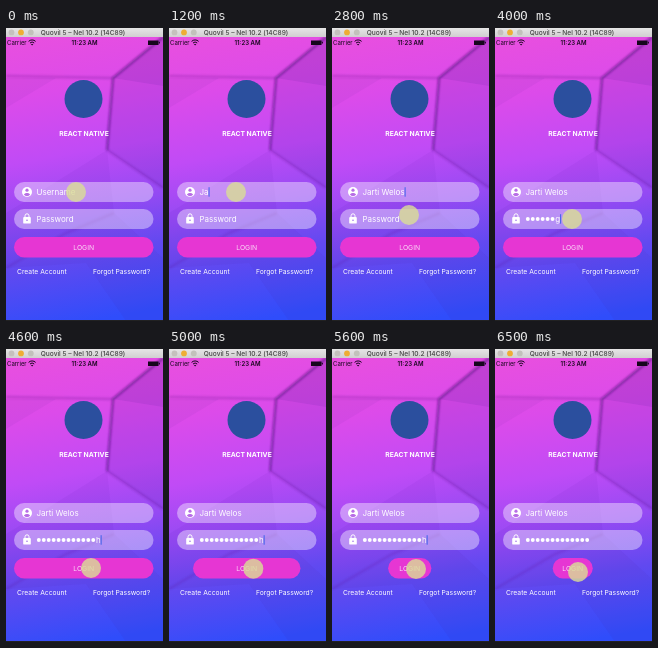
An HTML page for the animation above (6800 ms loop, 157 by 293 pixels).

```html
<!DOCTYPE html>
<html lang="en">
<head>
<meta charset="utf-8">
<style>
  html, body { margin: 0; width: 100%; height: 100%; overflow: hidden; }
  svg { display: block; width: 157px; height: 293px; }
  text { font-family: Inter, Roboto, sans-serif; fill: #fff; white-space: pre; }
  .field { font-size: 8px; }
  .small { font-size: 6.75px; }
  .status { font-size: 6px; fill: #16061c; }
  .mid { text-anchor: middle; }
</style>
</head>
<body>
<svg viewBox="0 0 157 293">
  <defs>
    <linearGradient id="sky" x1=".45" y1="0" x2=".55" y2="1">
      <stop offset="0" stop-color="#e84fdf"/>
      <stop offset=".2" stop-color="#dc4bea"/>
      <stop offset=".42" stop-color="#c04bf6"/>
      <stop offset=".6" stop-color="#964af3"/>
      <stop offset=".78" stop-color="#6149f0"/>
      <stop offset="1" stop-color="#2f4dfb"/>
    </linearGradient>
    <linearGradient id="bar" x1="0" y1="0" x2="0" y2="1">
      <stop offset="0" stop-color="#e6e5e6"/>
      <stop offset="1" stop-color="#d0cfd0"/>
    </linearGradient>
    <filter id="soft"><feGaussianBlur stdDeviation="1"/></filter>
  </defs>

  <rect width="157" height="293" fill="url(#sky)"/>
  <g fill="#40108c">
    <path d="M0 50H50L0 80Z" opacity=".06"/>
    <path d="M107 50 157 9V58Z" opacity=".2"/>
    <path d="M107 50 157 58V160L101 122Z" opacity=".1"/>
    <path d="M0 185 101 122 108 185 0 240Z" opacity=".05"/>
    <path d="M0 240 108 185 157 230V293H120L80 235Z" opacity=".06"/>
  </g>
  <g fill="none" stroke="#50127c" stroke-width="2.5" filter="url(#soft)">
    <path d="M157 9 107 50 101 122" opacity=".55"/>
    <path d="M0 48 107 50M101 122 157 160" opacity=".22"/>
    <path d="M0 240 60 205 108 185" opacity=".16"/>
  </g>

  <rect width="157" height="9" fill="url(#bar)"/>
  <rect y="292" width="157" height="1" fill="#222"/>
  <circle cx="5.5" cy="4.4" r="2.9" fill="#c5c0bd"/>
  <circle cx="15" cy="4.4" r="2.9" fill="#eead35"/>
  <circle cx="24.8" cy="4.4" r="2.9" fill="#c2c1bb"/>
  <text class="mid" x="77" y="6.9" font-size="6.6" font-weight="500" style="fill:#444">Quovil 5 – Nel 10.2 (14C89)</text>

  <text class="status" x="1" y="16.8">Carrier</text>
  <path d="M22.6 13.4a4.9 4.9 0 0 1 7 0M24 15a3 3 0 0 1 4.2 0" fill="none" stroke="#16061c"/>
  <path d="M24.9 15.9h2.4l-1.2 1.5ZM142 12.4h10.5v4.6h-10.5ZM152.9 13.8h1v1.8h-1Z" fill="#16061c"/>
  <text class="status mid" x="78.5" y="16.8" font-weight="600">11:23 AM</text>

  <circle cx="77.5" cy="71" r="19" fill="#2b4f9e"/>
  <text class="small mid" x="78" y="107.6" font-weight="700">REACT NATIVE</text>

  <g fill="#fff" fill-opacity=".4">
    <rect x="8" y="154" width="139.5" height="20" rx="10"/>
    <rect x="8" y="181" width="139.5" height="20" rx="10"/>
  </g>
  <circle cx="21" cy="164" r="5" fill="#fff"/>
  <circle cx="21" cy="162.2" r="1.6" fill="#b86ee6"/>
  <path d="M17.9 166.6c.6-2.2 5.6-2.2 6.2 0a3.8 3.8 0 0 1-6.2 0Z" fill="#b86ee6"/>
  <rect x="17.2" y="189" width="7.6" height="6.6" rx=".9" fill="#fff"/>
  <path d="M19 189.2v-1.4a2 2 0 0 1 4 0V189.2" fill="none" stroke="#fff"/>
  <circle cx="21" cy="192.3" r=".8" fill="#a070e8"/>

  <text id="user" class="field" x="30.5" y="166.9"></text>
  <g id="dots" fill="#fff"></g>
  <text id="pass" class="field" y="193.9"></text>
  <rect id="caret" width="1" height="9.5" fill="#3f62ea"/>

  <rect id="button" y="209" height="20.5" rx="10.25" fill="#e636d3"/>
  <text class="mid" x="77.7" y="221.8" font-size="6.8" fill-opacity=".8">LOGIN</text>
  <text class="small" x="11" y="246.2">Create Account</text>
  <text class="small" x="87" y="246.2">Forgot Password?</text>
  <circle id="touch" r="10" fill="#d9dc96" opacity=".82"/>
</svg>

<script>
const LOOP = 6800, STEP = 100, NAME = "Jarti Welos", SECRET = "dkfjsagldkfsh";
const FIELD_X = 30.5, DOT_PITCH = 4.95;
const $ = id => document.getElementById(id);
const set = (node, attrs) => {
  for (const key in attrs) node.setAttribute(key, attrs[key]);
};

// Time at which each character is on screen
const nameTimes = [700, 1200, 1300, 1400, 1500, 1700, 2000, 2100, 2200, 2300, 2400];
const secretTimes = [3300, 3300, 3500, 3700, 3700, 3800, 4000, 4100, 4200, 4300, 4400, 4500, 4600];
const touchPath = [
  [0, 70, 164], [300, 67, 164], [2600, 67, 164], [2800, 77, 187], [3000, 77, 191],
  [4200, 77, 191], [4600, 85, 219], [5200, 84, 220], [6100, 84, 220], [6200, 83, 223]
];
const typed = (times, t) => times.filter(at => at <= t).length;

function pointAt(path, t) {
  const next = path.findIndex(p => p[0] > t);
  if (next < 0) return path[path.length - 1].slice(1);
  const [t0, x0, y0] = path[next - 1], [t1, x1, y1] = path[next];
  const k = (t - t0) / (t1 - t0);
  return [x0 + (x1 - x0) * k, y0 + (y1 - y0) * k];
}

const dots = [...SECRET].map((_, i) => {
  const dot = document.createElementNS("http://www.w3.org/2000/svg", "circle");
  set(dot, { cx: FIELD_X + 2.3 + i * DOT_PITCH, cy: 191, r: 1.95 });
  return $("dots").appendChild(dot);
});

function draw(t) {
  const nameCount = typed(nameTimes, t), secretCount = typed(secretTimes, t);
  const masked = t >= 5900;
  const dotCount = masked ? secretCount : Math.max(0, secretCount - 1);
  const inPassword = t >= 3000;

  $("user").textContent = nameCount ? NAME.slice(0, nameCount) : "Username";
  dots.forEach((dot, i) => set(dot, { visibility: i < dotCount ? "visible" : "hidden" }));
  const lastX = FIELD_X + dotCount * DOT_PITCH;
  set($("pass"), { x: lastX });
  $("pass").textContent = !secretCount ? "Password" : masked ? "" : SECRET[secretCount - 1];

  const active = inPassword ? $("pass") : $("user");
  const filled = inPassword ? secretCount : nameCount;
  set($("caret"), {
    x: (inPassword ? lastX : FIELD_X) + (filled ? active.getComputedTextLength() : -0.5),
    y: inPassword ? 186.2 : 159.2,
    visibility: t >= 300 && !masked ? "visible" : "hidden"
  });

  const width = Math.max(40, 139.5 - Math.max(0, t - 4700) * 0.107);
  set($("button"), { x: 77.75 - width / 2, width });
  const [cx, cy] = pointAt(touchPath, t);
  set($("touch"), { cx, cy });
}

const start = performance.now();
function frame() {
  const t = (performance.now() - start) % LOOP;
  draw(Math.floor(t / STEP) * STEP);
  requestAnimationFrame(frame);
}
frame();
</script>
</body>
</html>
```
